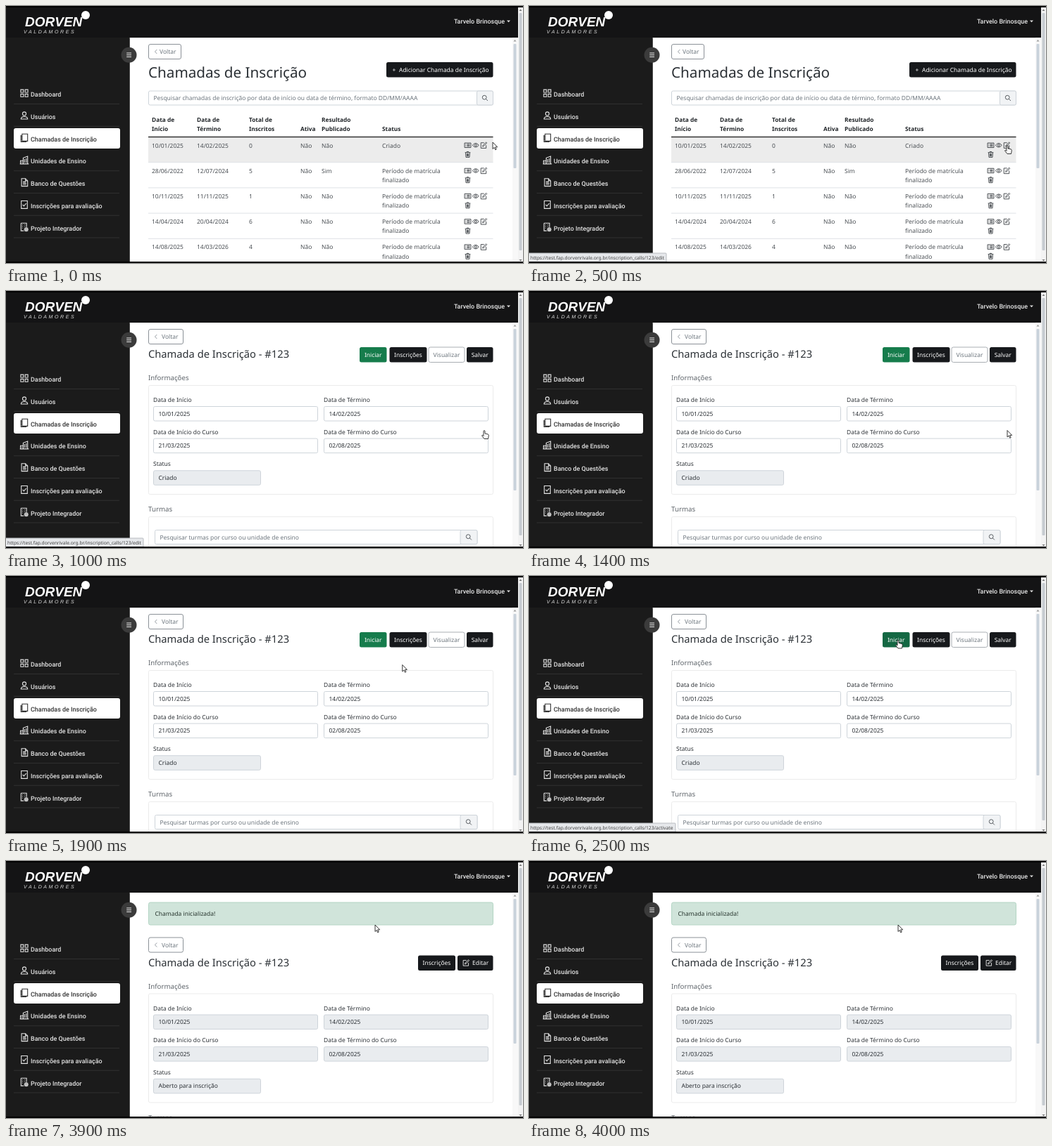
Write an HTML page that moves like this. It is 734x366 px and loops after 4600 ms.

```html
<!DOCTYPE html>
<html lang="pt-BR">
<meta charset="utf-8">
<title>Chamadas de Inscrição</title>
<style>
html, body { margin: 0; overflow: hidden; background: #000 }
svg { display: block; font: 8.45px "Noto Sans", sans-serif; text-rendering: geometricPrecision }
.menu { font: 500 8.95px Roboto, sans-serif }
.brand { font: italic bold 19px "Liberation Sans", sans-serif }
.region { font: italic 7px "Liberation Sans", sans-serif; letter-spacing: 2.6px }
.h1 { font-size: 20.66px }
.h2 { font-size: 14.7px }
.h3 { font-size: 9.7px }
.th { font-size: 8.3px; font-weight: bold }
.url { font-size: 6.7px }
</style>
<svg id="stage" width="734" height="366" viewBox="0 0 734 366"></svg>
<script>
const INK = '#2b3035', GRAY = '#6c757d', BLACK = '#17191c', LINE = '#ced4da', FIELD = '#e9ecef';

const text = (x, y, s, fill = INK, cls = '', anchor = 'start') =>
  `<text x="${x}" y="${y}" fill="${fill}" class="${cls}" text-anchor="${anchor}">${s}</text>`;
const rect = (x, y, w, h, fill, stroke = 'none', r = 0) =>
  `<rect x="${x}" y="${y}" width="${w}" height="${h}" rx="${r}" fill="${fill}" stroke="${stroke}"/>`;
const line = (x1, x2, y, color, w = 1) =>
  `<path d="M${x1} ${y}H${x2}" stroke="${color}" stroke-width="${w}"/>`;
const group = (id, body) => `<g id="${id}" visibility="hidden">${body}</g>`;

// Icons live on a 16-unit grid and are centred on (x, y).
const icons = {
  grid: 'M1.5 1.5h5v5h-5zM9.5 1.5h5v5h-5zM1.5 9.5h5v5h-5zM9.5 9.5h5v5h-5z',
  user: 'M8 1.5a3 3 0 1 1 0 6.5a3 3 0 1 1 0-6.5M2 14.5q0-4.5 6-4.5t6 4.5z',
  notebook: 'M4 1h10v13H4zM2 3v12.5h10M1 5h3M1 8h3M1 11h3',
  buildings: 'M1 15V9h5v6zM6 15V4l8-3v14zM8.5 6v7M11.5 5v8M3.5 11v2M0 15h16',
  file: 'M3 1h7l4 4v10H3zM10 1v4h4M5.5 7h5M5.5 9.5h6M5.5 12h6',
  check: 'M2.500 1h11v14h-11zM5 8l2.200 2.500L11.500 5.500',
  tower: 'M2 1h10v7M2 1v14h5M4.500 4h1M8.500 4h1M4.500 7h1M8.500 7h1M4.500 10h1M9 10h5v5H9zM7.500 12.500h8M11.500 8.500v8',
  list: 'M.5 2.500h15v11H.5zM3 5.500h1M6 5.500h7M3 8h1M6 8h7M3 10.500h1M6 10.500h7',
  eye: 'M.5 8Q8-1.500 15.500 8Q8 17.500 .5 8zM8 5.500a2.500 2.500 0 1 1 0 5a2.500 2.500 0 1 1 0-5',
  edit: 'M9 2H1.500v13H14V8M5.500 11l1-3L14 .7l1.700 1.700L8.500 10z',
  trash: 'M1.500 3.500h13M6 3V1.500h4V3M3 4l.8 11h8.400L13 4M6 6v7M8 6v7M10 6v7',
  search: 'M6.500 1a5.500 5.500 0 1 1 0 11a5.500 5.500 0 1 1 0-11M10.500 10.500L15.500 15.500',
  back: 'M10.500 2L5 8l5.500 6',
};
const icon = (name, x, y, color = INK, size = 9.5, w = 1.4) =>
  `<path d="${icons[name]}" fill="none" stroke="${color}" stroke-width="${w}"
    transform="translate(${x - size / 2} ${y - size / 2}) scale(${size / 16})"/>`;

const button = (x, y, w, label, fill = BLACK, color = '#fff', stroke = 'none') =>
  rect(x, y, w, 21.500, fill, stroke, 2.500) + text(x + w / 2, y + 13.800, label, color, '', 'middle');
const back = (y, w) => rect(202.5, y + .5, w - 1, 21, '#fff', '#8b9197', 2.5) +
  icon('back', 213, y + 11, GRAY, 8) + text(202 + w - 31, y + 14, 'Voltar', GRAY);
const searchBox = (x, y, w, side, hint) => rect(x, y, w, 20, '#fff', LINE, 2) +
  rect(x + w - side, y, side, 20, '#f1f3f5', LINE, 2) +
  text(x + 7, y + 13.200, hint, GRAY) + icon('search', x + w - side / 2, y + 10, INK, 8.5);
const thumb = bottom => rect(720.5, 54, 4, bottom - 54, '#c9d2db', 'none', 1);

function chrome() {
  const items = [['grid', 'Dashboard'], ['user', 'Usuários'], ['notebook', 'Chamadas de Inscrição'],
    ['buildings', 'Unidades de Ensino'], ['file', 'Banco de Questões'],
    ['check', 'Inscrições para avaliação'], ['tower', 'Projeto Integrador']];
  const menu = items.map(([name, label], i) => {
    const y = 125.700 + 31.750 * i, active = i == 2, color = active ? '#333' : '#e4e4e4';
    return (active ? rect(11, 174, 151, 29, '#fff', 'none', 3) : line(11, 161, y + 13.800, '#303030')) +
      icon(name, 26, y - 1.5, color, 12.5) + text(35, y + 3.500, label, color, 'menu');
  }).join('');
  return rect(0, 2, 727, 43, '#141415') + rect(0, 45, 175.500, 319, '#1b1b1b') + menu +
    text(27, 28.5, 'DORVEN', '#fff', 'brand') + '<circle cx="113" cy="13" r="6" fill="#fff"/>' +
    text(25, 38.800, 'VALDAMORES', '#ddd', 'region') +
    text(708, 25, 'Tarvelo Brinosque', '#e8e8e8', 'menu', 'end') +
    '<path d="M711 20.500h5l-2.500 2.800z" fill="#ddd"/>' +
    '<circle cx="174.500" cy="69.700" r="11" fill="#3b3b3b"/>' +
    [67, 69.7, 72.4].map(y => line(171.2, 178, y, '#eee')).join('');
}

function scrollbars() {
  return rect(719, 45, 8, 319, '#f8f8f8') + '<path d="M720.500 50.500h4l-2-2.500z" fill="#999"/>' +
    rect(727, 2, 7, 362, '#f3f3f3') + rect(728.5, 10, 4, 338, '#c6cbd0', 'none', 1) +
    '<path d="M728.500 7h4l-2-2.500zM728.500 361h4l-2 2.500z" fill="#777"/>';
}

function listPage() {
  const cols = [207, 271, 345, 418, 448, 534];
  const heads = ['Data de|Início', 'Data de|Término', 'Total de|Inscritos', '|Ativa', 'Resultado|Publicado', '|Status'];
  const done = 'Período de matrícula|finalizado';
  const rows = [
    ['10/01/2025', '14/02/2025', 0, 'Não', 'Não', 'Criado'],
    ['28/06/2022', '12/07/2024', 5, 'Não', 'Sim', done],
    ['10/11/2025', '11/11/2025', 1, 'Não', 'Não', done],
    ['14/04/2024', '20/04/2024', 6, 'Não', 'Não', done],
    ['14/08/2025', '14/03/2026', 4, 'Não', 'Não', done]];
  const cells = (row, y, color, cls) => row.map((cell, c) =>
    String(cell).split('|').map((s, k) => text(cols[c], y + 13.300 * k, s, color, cls)).join('')).join('');
  return back(54, 47) + text(202, 102.300, 'Chamadas de Inscrição', INK, 'h1') +
    button(540, 80, 151.500, '') + text(548.5, 93.800, '+', '#fff') +
    text(558, 93.800, 'Adicionar Chamada de Inscrição', '#fff') +
    searchBox(202.5, 121, 489, 23, 'Pesquisar chamadas de inscrição por data de início ou data de término, formato DD/MM/AAAA') +
    cells(heads, 164.700, '#212529', 'th') + rect(202, 187, 489.500, 35.500, '#ececec') +
    line(202, 691.5, 186.5, '#333', 1.3) +
    rows.map((row, i) => {
      const y = 198.300 + 36.200 * i;
      return cells(row, y + 3.200, '#4a4f54', '') + line(202, 691.5, y + 24.400, '#dee2e6') +
        ['list', 'eye', 'edit'].map((name, k) => icon(name, 655.5 + 11.300 * k, y)).join('') +
        icon('trash', 655.5, y + 13);
    }).join('') + thumb(231);
}

function formPage(dy, status, locked, actions) {
  const field = (x, y, w, label, value, off = locked) => text(x, y, label) +
    rect(x + .5, y + 6.500, w - 1, 20.500, off ? FIELD : '#fff', LINE, 2) + text(x + 7.500, y + 19.500, value);
  return `<g transform="translate(0 ${dy})">` + back(54, 50) +
    text(202, 95.300, 'Chamada de Inscrição - #123', INK, 'h2') + actions +
    text(202, 127.300, 'Informações', '#5f656b', 'h3') + rect(202.5, 134.5, 489, 155, '#fff', '#ebebeb', 2) +
    field(209, 158, 234, 'Data de Início', '10/01/2025') + field(451, 158, 234, 'Data de Término', '14/02/2025') +
    field(209, 203.600, 234, 'Data de Início do Curso', '21/03/2025') +
    field(451, 203.600, 234, 'Data de Término do Curso', '02/08/2025') +
    field(209, 249.300, 153, 'Status', status, true) +
    text(202, 314.300, 'Turmas', '#5f656b', 'h3') + rect(202.5, 321.5, 489, 80, '#fff', '#ebebeb', 2) +
    searchBox(211.5, 340.5, 457.5, 24, 'Pesquisar turmas por curso ou unidade de ensino') + '</g>';
}

const editActions =
  '<g id="ring"><rect x="501" y="79" width="40" height="23.500" rx="3.500" fill="none" stroke="#8ec3a9" stroke-width="2.200"/></g>' +
  '<g id="start">' + button(502, 80, 38.500, 'Iniciar', 'inherit') + '</g>' +
  button(544.5, 80, 53, 'Inscrições') + button(600, 80, 51, 'Visualizar', '#fff', GRAY, '#a9aeb3') +
  button(654, 80, 37.500, 'Salvar');
const showActions = button(585, 80, 53, 'Inscrições') + button(641, 80, 50.500, '') +
  icon('edit', 653, 90.5, '#fff', 9.5) + text(662, 93.800, 'Editar', '#fff');
const alertBox = rect(202.5, 59, 489, 32, '#d0e4da', '#b4d5c4', 2.5) + text(211.5, 78.300, 'Chamada inicializada!', '#25332c');

const statusBar = (w, path) => rect(-1, 352, w, 13, '#e6e8eb', '#b9bcc0', 1) +
  text(2, 361.300, 'https://test.fap.dorvenrivale.org.br/inscription_calls/123/' + path, '#444', 'url');

const stage = document.getElementById('stage');
stage.innerHTML = rect(175.5, 45, 544, 319, '#fff') + rect(175.5, 45, 544, 1.5, '#e4e4e4') + scrollbars() +
  group('list', listPage()) +
  group('edit', formPage(0, 'Criado', false, editActions) + thumb(284)) +
  group('show', formPage(54.5, 'Aberto para inscrição', true, showActions) + alertBox + thumb(260)) +
  chrome() + group('editUrl', statusBar(196, 'edit')) + group('startUrl', statusBar(209, 'activate')) +
  rect(0, 364, 734, 2, '#000') +
  group('arrow', '<path d="M0 0v9.500l2.200-2l1.500 3.300l1.500-.7l-1.500-3.200h3z" fill="#fff" stroke="#222" stroke-width=".9"/>') +
  group('hand', '<path d="M-1 .8q1-1.300 2 0v3.700l4 .9q1.400.4 1.300 1.800l-.8 4.800h-5.500l-3.400-4.300q.2-1.400 1.400-.7l1 1z" fill="#fff" stroke="#222" stroke-width=".9"/>');

const $ = id => document.getElementById(id);
const show = (id, on) => $(id).setAttribute('visibility', on ? 'visible' : 'hidden');
const within = (t, a, b) => t >= a && t < b;
const easeOut = (t, a, b, power) => 1 - (1 - Math.min(1, Math.max(0, (t - a) / (b - a)))) ** power;

function pointer(t) {
  if (t < 1600) {
    const u = easeOut(t, 0, 400, 1.5);
    return [691 - 12 * u, 194 + 4.500 * u];
  }
  return [679 - 155 * easeOut(t, 1600, 2200, 2), 198.5 - 107.5 * easeOut(t, 1600, 2200, 1.6)];
}

function draw(now) {
  const t = Math.floor(now % 4600 / 100) * 100;
  show('list', t < 1000);
  show('edit', within(t, 1000, 3900));
  show('show', t >= 3900);
  show('editUrl', within(t, 500, 1200));
  show('startUrl', within(t, 2400, 3900));
  $('start').setAttribute('fill', t < 2300 ? '#167c4c' : '#146843');
  $('ring').setAttribute('opacity', within(t, 2900, 3900) ? Math.min(1, (t - 2800) / 200) : 0);

  const hand = within(t, 400, 1400) || within(t, 2300, 3900);
  show('hand', hand);
  show('arrow', !hand);
  $(hand ? 'hand' : 'arrow').setAttribute('transform', `translate(${pointer(t)})`);
  requestAnimationFrame(draw);
}
requestAnimationFrame(draw);
</script>
</html>
```
